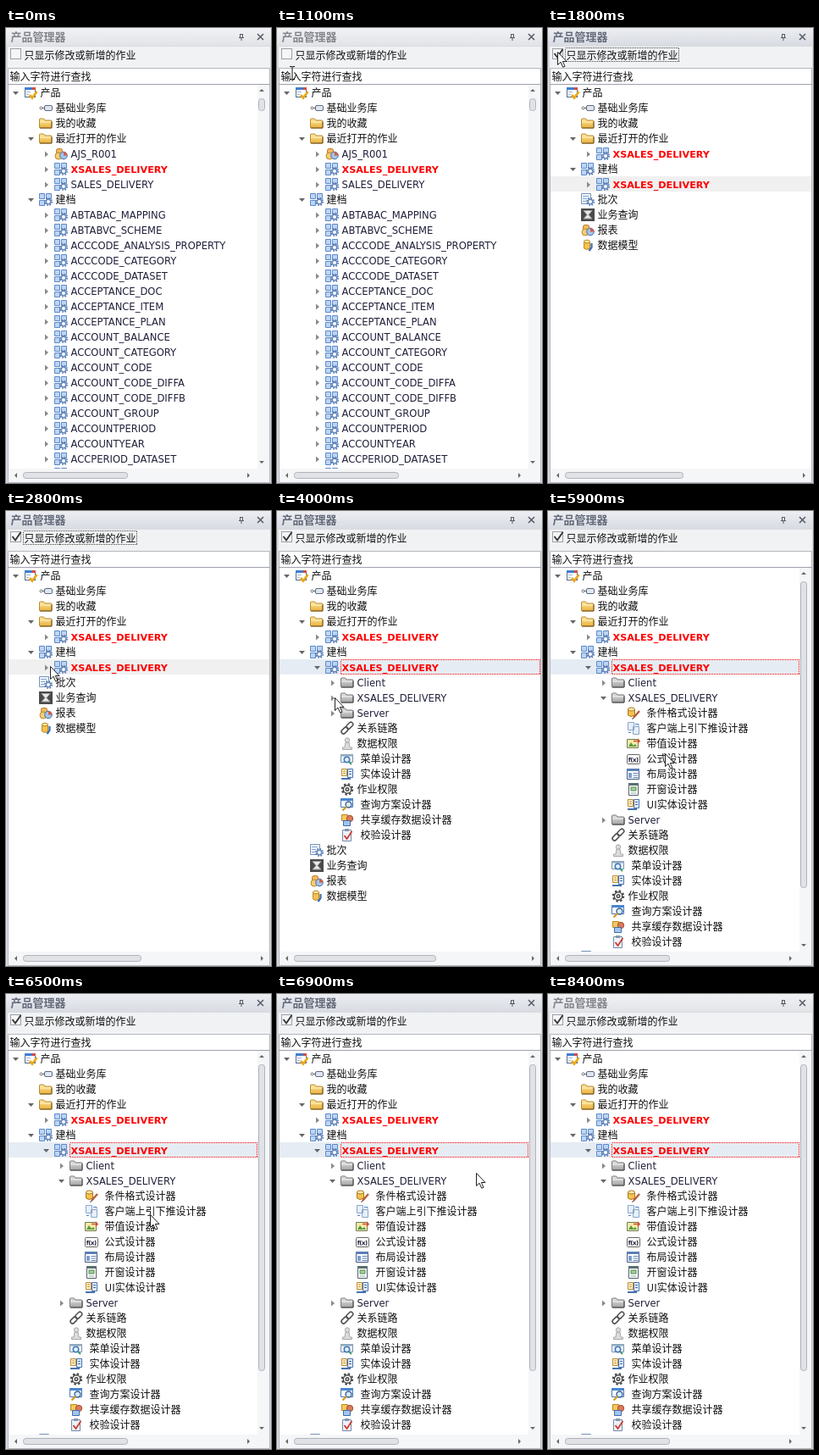
An HTML page for the animation above (8500 ms loop, 313x537 px).

```html
<!DOCTYPE html>
<html lang="zh-CN">
<head>
<meta charset="utf-8">
<title>产品管理器</title>
<style>
  html, body { margin: 0; width: 100%; height: 100%; overflow: hidden; background: #fff; }
  svg#stage { display: block; width: 313px; height: 537px; }
  text { font: 11.55px "DejaVu Sans", sans-serif; fill: #20203a; white-space: pre; }
  text.cjk { font: 12px "Noto Sans CJK SC", "Noto Sans CJK", sans-serif; fill: #111; }
  text.red { font: bold 11.2px "DejaVu Sans", sans-serif; fill: #f00; }
  text.title { font-size: 13px; font-weight: bold; fill: #83858c; }
  .active text.title { fill: #646a7a; }
  .strip { fill: url(#pale); }
  .active .strip { fill: url(#bar); }
  .thumb { fill: #e0e2e6; stroke: #b0b3bb; }
  .hot .thumb.v { fill: #c6cad3; stroke: #8b909c; }
  .dots { fill: none; stroke: #444; stroke-dasharray: 1 1; shape-rendering: crispEdges; }
  .dots.ring { stroke: #f00; }
</style>
</head>
<body>
<svg id="stage" viewBox="0 0 313 537">
  <defs>
    <linearGradient id="pale" x2="0" y2="1">
      <stop offset="0" stop-color="#f1f2f4"/><stop offset="1" stop-color="#e2e3e7"/>
    </linearGradient>
    <linearGradient id="bar" x2="0" y2="1">
      <stop offset="0" stop-color="#eceef2"/><stop offset="1" stop-color="#d8dbe2"/>
    </linearGradient>
    <linearGradient id="gold" x2="0" y2="1">
      <stop offset="0" stop-color="#ffe9a0"/><stop offset="1" stop-color="#e8b03c"/>
    </linearGradient>
    <linearGradient id="silver" x2="0" y2="1">
      <stop offset="0" stop-color="#e4e4e4"/><stop offset="1" stop-color="#a2a2a2"/>
    </linearGradient>
    <clipPath id="tree"><rect x="3" y="67" width="309" height="453"/></clipPath>

    <g id="cog" fill="none">
      <circle r="4.200" stroke="#5a7cb0" stroke-width="1.700" stroke-dasharray="1.700 1.600"/>
      <circle r="2.800" stroke="#6689bf" stroke-width="1.600" fill="#fff"/>
    </g>
    <g id="root">
      <rect x="1.500" y="2.500" width="12" height="11" fill="#fff" stroke="#55688a"/>
      <path d="M1 2h13v3H1z" fill="#3f7fcf"/><path d="M10 2h4v3h-4z" fill="#d84b3c"/>
      <path d="M3 7.500h5M3 10.500h3" stroke="#9db8d8"/>
      <path d="M7 11l3 3.500L15.500 7" fill="none" stroke="#e9a91c" stroke-width="2.800"/>
    </g>
    <g id="plug">
      <path d="M3 8.500h4" stroke="#666"/><circle cx="2.500" cy="8.500" r="1.500" fill="#fff" stroke="#666"/>
      <rect x="6.500" y="5.500" width="9" height="6" rx="1.500" fill="#dfe6f0" stroke="#5d6a80"/>
    </g>
    <path id="flap" d="M.5 4q0-1 1-1h4l1.500 2h7q1 0 1 1v7q0 1-1 1h-12.500q-1 0-1-1z"/>
    <g id="folder">
      <use href="#flap" fill="url(#gold)" stroke="#b98a30"/><path d="M1 7h13" stroke="#fff3c4"/>
      <path d="M1 14h14V6.500" fill="none" stroke="#6f5525"/>
    </g>
    <g id="grey">
      <use href="#flap" fill="url(#silver)" stroke="#777"/><path d="M1 7h13" stroke="#f2f2f2"/>
      <path d="M1 14h14V6.500" fill="none" stroke="#444"/>
    </g>
    <g id="pie">
      <rect x="2.500" y="2.500" width="7" height="7" rx="2" fill="#f3b95c" stroke="#b8792c"/>
      <circle cx="5" cy="11" r="4" fill="#f6cf74" stroke="#b88730"/>
      <circle cx="11" cy="10.500" r="4.300" fill="#a5c4e8" stroke="#3f6cab"/>
      <path d="M11 10.500V6.200a4.300 4.300 0 0 1 4.300 4.300z" fill="#d65b44"/>
    </g>
    <g id="grid">
      <g fill="#bdd5f5" stroke="#5c89c8">
        <path d="M.5 1.500h6v6h-6zM8.500 1.500h6v6h-6zM.5 9.500h6v6h-6z"/>
      </g>
      <use href="#cog" x="11" y="11"/>
    </g>
    <g id="batch">
      <path d="M.5 1.500h11v12h-11z" fill="#f4f8fd" stroke="#7892b5"/>
      <path d="M2 4.500h7M2 7.500h5M2 10.500h4" stroke="#7fa2d2"/>
      <use href="#cog" x="11" y="11"/>
    </g>
    <g id="sum">
      <path d="M0 1h16v15H0z" fill="#4a4a4a"/>
      <path d="M3 3.500h10l-4 5 4 4.500H3l4-4.500z" fill="#e8e8e8" stroke="#999"/>
    </g>
    <g id="data">
      <path d="M3.500 4v8q3 3 7 0V4z" fill="#f5c34c" stroke="#bd882a"/>
      <ellipse cx="7" cy="4" rx="3.500" ry="1.800" fill="#ffeaa8" stroke="#bd882a"/>
      <path d="M12.500 6v5l-3 4" stroke="#3d6db5" stroke-width="2.200" fill="none"/>
    </g>
    <g id="link" fill="none" stroke="#555" stroke-width="1.600">
      <rect x="-4" y="-2.500" width="9" height="5" rx="2.500" transform="translate(10.500 5.500) rotate(-45)"/>
      <rect x="-4.500" y="-2.500" width="9" height="5" rx="2.500" transform="translate(5 11) rotate(-45)"/>
    </g>
    <g id="pawn" fill="#dcdcdc" stroke="#a8a8a8">
      <path d="M6 7h4l1 6h2.500v2.500h-11V13H5z"/><circle cx="8" cy="4.500" r="2.700"/>
    </g>
    <g id="menu">
      <path d="M.5 3.500h14v9H.5z" fill="#eef3f8" stroke="#7d93a8"/><path d="M0 3h15v2.500H0z" fill="#8fa9bd"/>
      <circle cx="7.500" cy="9.500" r="3.200" fill="#e5f1fb" stroke="#3f78bd" stroke-width="1.500"/>
      <path d="M10 12l3 3" stroke="#3f9a70" stroke-width="1.800"/>
    </g>
    <g id="entity">
      <path d="M1.500 2.500h6v8h-6z" fill="#fff3cf" stroke="#b68b34"/>
      <path d="M8.500 2.500h6v10h-6z" fill="#e3edf9" stroke="#4772ad"/>
      <path d="M3 5h3M3 7.500h3" stroke="#d18c25"/><path d="M10 5.500h3M10 8.500h3" stroke="#3c6db2"/>
      <path d="M1 14h11" stroke="#4772ad" stroke-width="2"/>
    </g>
    <g id="gear" fill="none" stroke="#444">
      <circle cx="8" cy="8.500" r="6.200" stroke-width="2" stroke-dasharray="2.400 2.470"/>
      <circle cx="8" cy="8.500" r="4.700" stroke-width="1.400"/><circle cx="8" cy="8.500" r="1.800" stroke-width="1.400"/>
    </g>
    <g id="query">
      <path d="M.5 1.500h14v10H.5z" fill="#fff" stroke="#4777b5"/><path d="M0 1h15v3H0z" fill="#4a87d0"/>
      <circle cx="9.500" cy="8.500" r="3.500" fill="#d6eafa" stroke="#3a6296" stroke-width="1.400"/>
      <path d="M7 11l-4.500 4.500" stroke="#d69a25" stroke-width="2.300"/>
    </g>
    <g id="cache">
      <path d="M1.500 2.500h7v7h-7z" fill="#f6c95a" stroke="#b98526"/>
      <circle cx="11" cy="7" r="3.700" fill="#db7b5c" stroke="#a94a30"/>
      <path d="M3.500 9.500h8v6h-8z" fill="#a4c5ee" stroke="#3f6cab"/>
    </g>
    <g id="check">
      <path d="M2.500 2.500h10v13h-10z" fill="#eef2f8" stroke="#7389a8"/><path d="M5 1h5v3H5z" fill="#8797ad"/>
      <path d="M4.500 9l3 4 6-9" fill="none" stroke="#cf3a30" stroke-width="1.800"/>
    </g>
    <g id="format">
      <path d="M1.500 4v7q3 3 8 0V4z" fill="#f5c34c" stroke="#a9762a"/>
      <ellipse cx="5.500" cy="4" rx="4" ry="2" fill="#ffeaa8" stroke="#a9762a"/>
      <path d="M15 6l-7 8" stroke="#b5603a" stroke-width="2.400"/><path d="M8 14l-1.500 2" stroke="#333"/>
    </g>
    <g id="pages" fill="#e6eff9" stroke="#8aa6c8">
      <path d="M1.500 1.500h7v9h-7zM7.500 6.500h7v9h-7z"/><path d="M10 3.500h4v2M2 13.500h3" fill="none" stroke="#4b86cc"/>
    </g>
    <g id="image">
      <path d="M.5 3.500h13v10H.5z" fill="#fbe9a6" stroke="#6d7c52"/>
      <path d="M2 12l3-5 3 4 2-2 2 3z" fill="#4f9c48"/>
      <path d="M8 5.500h7l-2-2.500m2 2.500L13 8" fill="none" stroke="#c8502f" stroke-width="1.400"/>
    </g>
    <g id="fx">
      <rect x=".5" y="3.500" width="15" height="11" rx="1" fill="#fff" stroke="#666"/>
      <text x="1.800" y="11.500" style="font:bold 7px 'DejaVu Sans',sans-serif;letter-spacing:-.5px">f(x)</text>
    </g>
    <g id="layout">
      <path d="M.5 2.500h14v12H.5z" fill="#fff" stroke="#44597f"/><path d="M0 2h15v3H0z" fill="#5c7fb5"/>
      <path d="M2 7h4v6H2z" fill="#7d9fd0"/><path d="M7.500 7.500h6M7.500 10h6M7.500 12.500h6" stroke="#5c7fb5"/>
    </g>
    <g id="popup">
      <path d="M2.500 1.500h11v14h-11z" fill="#fff" stroke="#555f6b"/><path d="M2 1h12v3H2z" fill="#5c6f70"/>
      <path d="M5 6h6v4H5z" fill="#a8d19c" stroke="#4b8a4c"/><path d="M5 13h6" stroke="#8aa"/>
    </g>
  </defs>

  <rect width="313" height="537" fill="#d9dbe0"/>
  <g id="caption">
    <rect class="strip" width="313" height="21"/>
    <text class="cjk title" x="5.500" y="15">产品管理器</text>
    <path d="M276 7.500h4M276.500 7v4M279.500 7v4M275 11.500h6M278 12v3" stroke="#555a66" fill="none"/>
    <path d="M297 7l7 7M304 7l-7 7" stroke="#555a66" stroke-width="1.500"/>
  </g>
  <rect x="2" y="22" width="310" height="25" fill="#f1f2f4"/>
  <rect x="5.500" y="24.500" width="12" height="12" fill="#f6f6f7" stroke="#9b9fa8"/>
  <path id="tick" d="M7.500 30l3.500 4.500 6.500-9.500" fill="none" stroke="#333" stroke-width="1.900"/>
  <text class="cjk" x="21.500" y="36.500">只显示修改或新增的作业</text>
  <rect id="focus" class="dots" x="20.500" y="23.500" width="134" height="16"/>
  <path d="M2.500 47.500h309v489h-309z" fill="#fff" stroke="#b4b7bf"/>
  <text class="cjk" x="4.500" y="62">输入字符进行查找</text>
  <path d="M2 66.500h310" stroke="#9ea2ab"/>
  <g id="scenes"></g>
  <g id="arrow"><path d="M.5.5v15l3.500-3.300 2.700 6 2.300-1-2.700-5.700h4.700z" fill="#fff" stroke="#222"/></g>
  <path id="beam" d="M-3-7.500h2.500l.5.500.5-.5H3M0-7V7M-3 7.500h2.500l.5-.5.5.5H3" fill="none" stroke="#111"/>
</svg>
<script>
const $ = id => document.getElementById(id);
const LOOP = 8500, STEP = 100, ROW = 18, TOP = 68;

// Row format: level, icon, label, expander. "!" marks a changed item, "~" a leading gap.
const list = s => s.trim().split('\n').map(r => r.trim().split(','));
const head = list(`0,root,产品,-
  1,plug,基础业务库
  1,folder,我的收藏
  1,folder,最近打开的作业,-`);
const changed = ['2', 'grid', '!XSALES_DELIVERY', '+'];
const opened = ['2', 'grid', '!XSALES_DELIVERY', '-'];
const archive = ['1', 'grid', '建档', '-'];
const tail = list(`1,batch,批次
  1,sum,业务查询
  1,pie,报表
  1,data,数据模型`);
const names = `ABTABAC_MAPPING ABTABVC_SCHEME ACCCODE_ANALYSIS_PROPERTY ACCCODE_CATEGORY
  ACCCODE_DATASET ACCEPTANCE_DOC ACCEPTANCE_ITEM ACCEPTANCE_PLAN ACCOUNT_BALANCE
  ACCOUNT_CATEGORY ACCOUNT_CODE ACCOUNT_CODE_DIFFA ACCOUNT_CODE_DIFFB ACCOUNT_GROUP
  ACCOUNTPERIOD ACCOUNTYEAR ACCPERIOD_DATASET`.split(/\s+/);
const client = ['3', 'grey', 'Client', '+'];
const module = sign => ['3', 'grey', 'XSALES_DELIVERY', sign];
const parts = list(`4,format,~条件格式设计器
  4,pages,~客户端上引下推设计器
  4,image,~带值设计器
  4,fx,~公式设计器
  4,layout,~布局设计器
  4,popup,~开窗设计器
  4,entity,~UI实体设计器`);
const rest = list(`3,grey,Server,+
  3,link,关系链路
  3,pawn,数据权限
  3,menu,~菜单设计器
  3,entity,~实体设计器
  3,gear,作业权限
  3,query,~查询方案设计器
  3,cache,~共享缓存数据设计器
  3,check,~校验设计器`);

const scenes = [
  { from: 0, hbar: 124, vbar: [83, 15], rows: [...head,
      ['2', 'pie', 'AJS_R001', '+'], changed, ['2', 'grid', 'SALES_DELIVERY', '+'], archive,
      ...names.map(n => ['2', 'grid', n, '+']), ['2', 'grid', '', '']] },
  { from: 1500, hbar: 140, band: '#f0f0f0', rows: [...head, changed, archive, changed, ...tail] },
  { from: 3000, hbar: 168, band: '#e6ecf3', ring: true,
    rows: [...head, changed, archive, opened, client, module('+'), ...rest, ...tail] },
  { from: 5100, hbar: 124, vbar: [83, 362], band: '#e6ecf3', ring: true,
    rows: [...head, changed, archive, opened, client, module('-'), ...parts, ...rest, tail[0]] }
];

function rowSvg([level, icon, label, sign], i) {
  const x = 18 * level, y = TOP + ROW * i, mid = y + 9;
  const gap = label[0] === '~' ? 4 : 0;
  const red = label[0] === '!';
  const text = label.replace(/^[~!]/, '');
  const kind = red ? 'red' : /[^\x00-\x7f]/.test(text) ? 'cjk' : '';
  const mark = sign === '-' ? `<path d="M${x + 8} ${mid - 2}h7l-3.500 4z" fill="#666"/>`
    : sign === '+' ? `<path d="M${x + 10} ${mid - 3.500}v7l4-3.500z" fill="#8a8a8a"/>` : '';
  return `${mark}<use href="#${icon}" x="${x + 21}" y="${y}"/>
    <text class="${kind}" x="${x + 40.500 + gap}" y="${mid + 4}">${text}</text>`;
}

function barsSvg({ hbar, vbar }) {
  const end = vbar ? 286 : 302;
  let s = `<rect x="3" y="520" width="308" height="16" fill="#f5f6f8"/>
    <rect class="thumb" x="20.500" y="524.500" width="${hbar - 1}" height="7" rx="3"/>
    <path d="M13 525v6l-3-3zM${end - 1} 525v6l3-3z" fill="#666"/>`;
  if (vbar) s += `<rect x="297" y="67" width="14" height="453" fill="#f5f6f8"/>
    <rect class="thumb v" x="298.500" y="${vbar[0] + .5}" width="7" height="${vbar[1] - 1}" rx="3"/>
    <path d="M299 75h6l-3-3zM299 511h6l-3 3z" fill="#666"/>`;
  return s;
}

function sceneSvg(s) {
  const right = s.vbar ? 297 : 311, y = TOP + ROW * 6;
  const band = s.band ? `<rect x="3" y="${y - 1}" width="${right - 3}" height="18" fill="${s.band}"/>` : '';
  const ring = s.ring ? `<rect class="dots ring" x="75.500" y="${y - .5}" width="${right - 76}" height="17"/>` : '';
  return `<g><g clip-path="url(#tree)">${band}${ring}${s.rows.map(rowSvg).join('')}</g>${barsSvg(s)}</g>`;
}
$('scenes').innerHTML = scenes.map(sceneSvg).join('');
const groups = [...$('scenes').children];

// Pointer path: time, x, y
const path = [
  [200, 276, 99], [600, 62, 58], [800, 3, 27], [1000, 18, 53], [1100, 18, 53], [1300, 11, 28],
  [2000, 11, 28], [2800, 52, 183], [3200, 52, 183], [3600, 77, 212], [4000, 68, 220],
  [5300, 68, 220], [5900, 138, 286], [6000, 137, 285], [6400, 137, 285], [6700, 235, 211],
  [7100, 235, 211], [7400, 299, 130], [7500, 306, 87], [7600, 313, 87]
];
function pointer(t) {
  const i = path.findIndex(p => p[0] > t);
  if (i < 1) return null;
  const [a, b] = [path[i - 1], path[i]];
  const k = (t - a[0]) / (b[0] - a[0]);
  return [a[1] + (b[1] - a[1]) * k, a[2] + (b[2] - a[2]) * k].map(Math.round);
}

const show = (el, on) => { el.style.display = on ? '' : 'none'; };

function draw(t) {
  scenes.forEach((s, i) => show(groups[i], t >= s.from && t < (scenes[i + 1]?.from ?? LOOP)));
  show($('tick'), t >= 1400);
  show($('focus'), t >= 1400 && t < 3000);
  $('caption').classList.toggle('active', t >= 1400 && t < 8400);
  $('scenes').classList.toggle('hot', t >= 7400 && t < 7600);
  const p = pointer(t);
  const typing = p && p[1] > 46 && p[1] < 66;
  show($('beam'), typing);
  show($('arrow'), p && !typing);
  if (p) $(typing ? 'beam' : 'arrow').setAttribute('transform', `translate(${p})`);
}

function tick() {
  draw(Math.floor(performance.now() % LOOP / STEP) * STEP);
  requestAnimationFrame(tick);
}
tick();
</script>
</body>
</html>
```
